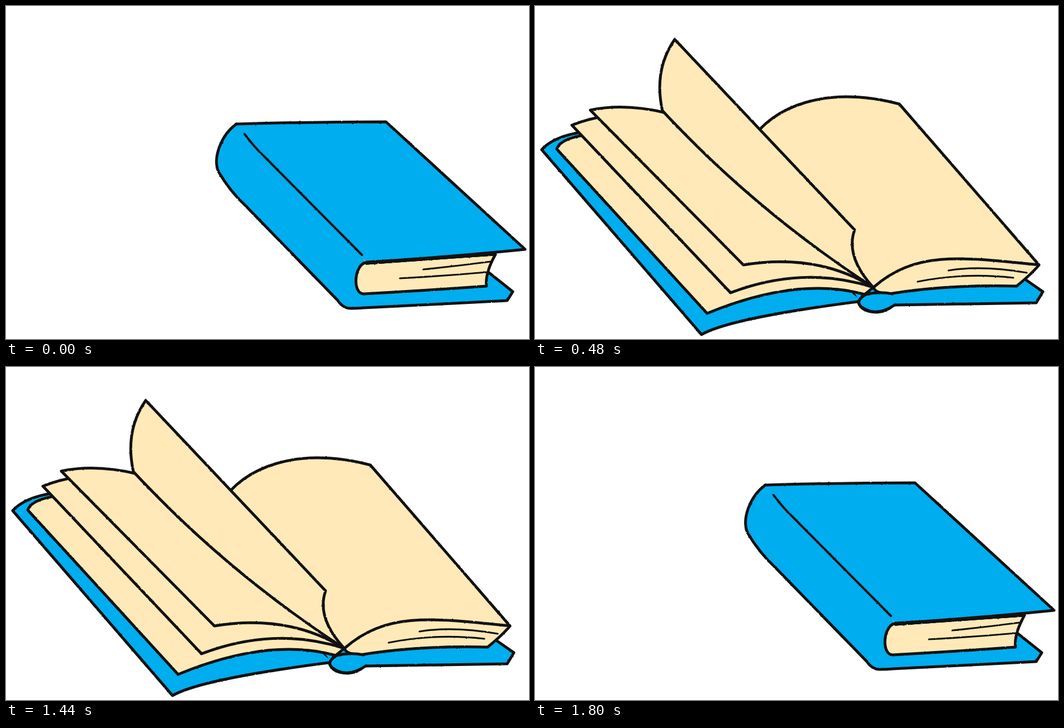
An HTML page that plays this animation: 936x598 px, repeating every 1.92 s.

```html
<!DOCTYPE html>
<html lang="en">
<head>
<meta charset="utf-8">
<title>Book</title>
<style>
  html, body { margin: 0; width: 100%; height: 100%; overflow: hidden; background: #fff; }
  svg { display: block; width: 100%; height: 100%; }
  path { stroke: #111; stroke-width: 5; stroke-linejoin: round; stroke-linecap: round; }
  .blue { fill: #00adef; }
  .cream { fill: #ffe9b8; }
  .line { fill: none; stroke-width: 4; }
  .thin { fill: none; stroke-width: 3.2; }
</style>
</head>
<body>
<svg viewBox="0 0 936 598">
  <filter id="rough" x="0" y="0" width="936" height="598" filterUnits="userSpaceOnUse" color-interpolation-filters="sRGB">
    <feTurbulence type="fractalNoise" baseFrequency=".22" numOctaves="2" seed="4"/>
    <feDisplacementMap in="SourceGraphic" scale="2" xChannelSelector="R" yChannelSelector="G"/>
  </filter>
  <g id="book" filter="url(#rough)"></g>
</svg>
<script>
const STEP = 40, STEPS = 48;
const book = document.getElementById('book');

// A path whose numbers glide through the poses keyed by step.
function track(cls, poses) {
  const el = document.createElementNS('http://www.w3.org/2000/svg', 'path');
  el.setAttribute('class', cls);
  const keys = Object.keys(poses).map(Number);
  const rows = keys.map(k => poses[k].match(/-?[\d.]+/g).map(Number));
  return { el, keys, rows, shape: poses[keys[0]], now: rows[0] };
}

function slope(t, i, c) {
  const d = j => (t.rows[j + 1][c] - t.rows[j][c]) / (t.keys[j + 1] - t.keys[j]);
  if (i === 0) return d(0);
  if (i === t.keys.length - 1) return d(i - 1);
  const a = d(i - 1), b = d(i);
  return a * b <= 0 ? 0 : (a + b) / 2;
}

function pose(t, k) {
  const { keys, rows } = t, last = keys.length - 1;
  if (k <= keys[0]) t.now = rows[0];
  else if (k >= keys[last]) t.now = rows[last];
  else {
    const i = keys.findIndex(v => v > k) - 1;
    const h = keys[i + 1] - keys[i], u = (k - keys[i]) / h, w = 1 - u;
    t.now = rows[i].map((a, c) =>
      a * (1 + 2 * u) * w * w + rows[i + 1][c] * u * u * (3 - 2 * u) +
      h * u * w * (slope(t, i, c) * w - slope(t, i + 1, c) * u));
  }
  let n = 0;
  t.el.setAttribute('d', t.shape.replace(/-?[\d.]+/g, () => t.now[n++].toFixed(1)));
}

const base = track('blue', {
  3: 'M412 212C385 232 370 272 380 297Q400 332 430 360L594 529Q603 543 617 543Q630 543 640 542L897 529L907 513L862 477',
  7: 'M354 282C354 282 354 282 354 282Q390 321 430 363L592 533Q600 545 617 543Q630 543 642 538L900 530L908 512L870 482',
  12: 'M450 320C450 320 450 320 450 320Q480 370 500 400L578 530Q583 550 612 550Q630 549 642 537L897 533L909 513L876 490'
});

// The stack of pages on the right, then its front top edge.
const block = track('cream', {
  3: 'M500 240C540 232 590 228 640 225L876 446Q857 480 860 503Q750 511 640 517C620 517 622 465 645 460M645 460C720 455 800 451 876 446',
  7: 'M400 270C480 240 600 250 705 298L882 455Q872 478 860 500Q750 508 640 513C605 514 607 510 607 505M607 505C650 445 700 450 882 455',
  12: 'M385 244C425 180 520 142 652 176L902 465Q890 480 862 503Q740 500 640 516C625 518 607 514 606 505M606 505C680 440 760 450 902 465'
});

const grain = track('thin', {
  3: 'M747 473Q807 467 867 459M705 489Q782 485 860 478',
  7: 'M752 472Q810 469 872 474M709 492Q780 482 868 487',
  12: 'M740 475Q800 465 880 479M685 495Q770 478 856 488'
});

// Leaves: back hinge, back curve, free edge, front curve, front hinge.
const cover = track('blue', {
  3: 'M412 212Q545 208 680 208L929 437Q780 452 645 460',
  5: 'M382 245Q450 140 530 42L820 285Q715 380 622 485',
  7: 'M354 282Q350 150 333 22L640 275Q615 390 607 505',
  9: 'M350 250Q215 165 110 135L395 430Q480 470 597 520',
  12: 'M200 225Q52 213 12 258L298 590Q350 560 585 530'
});

const page1 = track('cream', {
  3: 'M500 240Q560 230 640 225L870 446Q760 454 645 462L645 462',
  5: 'M440 250Q510 150 585 85L835 315Q725 360 622 485L622 485',
  7: 'M420 260Q425 70 453 6L724 224Q655 330 607 505L607 505',
  9: 'M370 245Q240 130 235 55L500 345Q525 430 603 510L606 505',
  12: 'M385 244Q55 205 39 257L308 552Q470 485 590 518L606 505',
  16: 'M385 244Q180 195 42 258L302 568Q450 510 590 518L606 505'
});

const page2 = track('cream', {
  3: 'M500 240Q560 230 640 225L870 446Q760 454 645 462',
  7: 'M430 260Q480 130 560 115L812 324Q680 370 607 505',
  9: 'M385 245Q350 100 380 25L640 290Q590 390 606 505',
  12: 'M235 192Q130 188 66 214L350 515Q480 465 605 505',
  16: 'M385 244Q235 162 62 245L313 537Q500 408 606 505'
});

const page3 = track('cream', {
  3: 'M500 240Q560 230 640 225L870 446Q760 454 645 462',
  7: 'M430 260Q560 200 690 228L845 399Q690 392 607 505',
  10: 'M375 240Q345 100 390 25L660 290Q590 390 606 505',
  12: 'M235 192Q160 174 99 187L373 465Q505 443 605 505',
  16: 'M385 244Q235 162 62 245L313 537Q500 408 606 505'
});

const page4 = track('cream', {
  7: 'M400 270Q550 245 705 298L882 455Q670 440 607 505Q500 385 400 270',
  10: 'M370 235Q410 100 500 55L770 330Q640 390 606 505Q480 370 370 235',
  12: 'M228 188Q212 115 250 60L572 402Q555 450 605 505Q395 368 228 188',
  14: 'M300 205Q170 120 110 130L390 470Q480 410 606 505Q440 360 300 205',
  16: 'M385 244Q235 162 62 245L313 537Q500 408 606 505Q497 372 385 244'
});

const crease = track('line', {
  3: 'M427 230Q445 254 460 268L637 447',
  7: 'M365 235Q385 255 405 273L600 471',
  9: 'M340 240Q360 260 380 280L590 475'
});

const spine = track('blue', {
  9: 'M640 517Q615 512 592 518Q568 532 590 544Q612 557 642 538'
});
const corner = track('line', { 16: 'M302 568L313 537' });

const leaves = [cover, page1, page2, page3, page4];
const parts = [base, block, grain, ...leaves, crease, spine, corner];

// True once a leaf has passed edge-on and lies on the left.
function turned({ now: n }) {
  return (n[10] - n[0]) * (n[5] - n[1]) > (n[11] - n[1]) * (n[4] - n[0]);
}

let shown = -1;
function draw(step) {
  const k = Math.min(step, STEPS - step);
  if (k === shown) return;
  shown = k;
  parts.forEach(p => pose(p, k));
  const live = leaves.filter(p => p !== page4 || k > 7);
  const left = live.filter(turned);
  const right = live.filter(p => !turned(p)).reverse();
  const order = [base, block, grain, ...left, ...right];
  order.push(turned(cover) ? spine : crease);
  if (k >= 16) order.push(corner);
  book.replaceChildren(...order.map(p => p.el));
}

const start = performance.now();
function tick() {
  draw(Math.floor((performance.now() - start) / STEP) % STEPS);
  requestAnimationFrame(tick);
}
tick();
</script>
</body>
</html>
```
